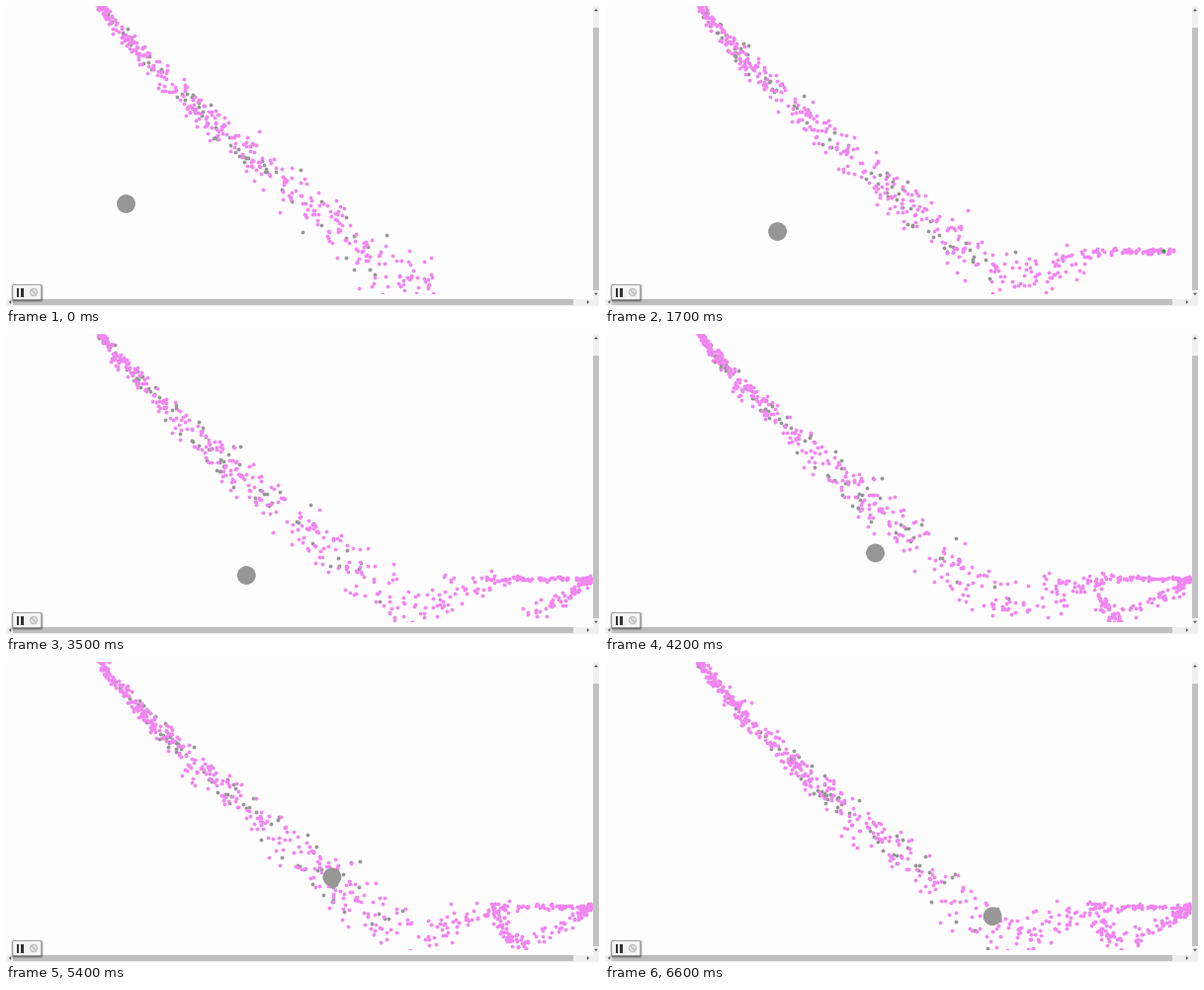
Animation, 600 px wide and 304 px high, one loop 6700 ms. Source, as a matplotlib script:

```python
import numpy as np
import matplotlib.pyplot as plt
from matplotlib.animation import FuncAnimation
from matplotlib.patches import Circle, FancyBboxPatch, Polygon, Rectangle

W, H, DPI = 600, 304, 100
FRAMES, STEP = 67, 100
LOOP = FRAMES * STEP / 1000
PINK, GREY, GREEN = "#f186f1", "#969696", "#1fa52d"

# Seconds spent in each leg of a particle's trip
FALL, HOP, WAIT, BACK, RISE = 6.3, 2.15, 0.25, 1.45, 1.05
HEAD_AGE = FALL + 0.3   # age of the leading particle when the loop starts


def leg(age, start, length):
    return np.clip((age - start) / length, 0, 1)


def stream(age):
    """Centre line (n, 2) and spread (n,): each leg adds its own displacement."""
    fall = leg(age, 0, FALL)
    hop = leg(age, FALL, HOP)
    climb = np.minimum(hop / 0.63, 1)
    back = leg(age, FALL + HOP + WAIT, BACK)
    rise = leg(age, FALL + HOP + WAIT + BACK, RISE)
    x = (94 + 318 * fall ** 1.4 + 179 * hop
         - 73 * back ** 2.8 - 22 * np.sin(rise * np.pi / 2))
    y = (-4 + 290 * fall ** 1.18 - 38 * (1 - (1 - climb) ** 2)
         + 40 * back ** 2.3 - 40 * rise)
    spread = 1.5 + 12 * fall - 12.3 * climb + 3.5 * back
    return np.column_stack([x, y]), spread


class Spray:
    def __init__(self, rng, rate, life):
        n = int(rate * (HEAD_AGE + LOOP))
        self.born = rng.uniform(-HEAD_AGE, LOOP, n)
        self.drift = np.clip(rng.normal(0, 1, (n, 2)), -2.4, 2.4)
        self.life = rng.uniform(*life, n)

    def at(self, t):
        age = t - self.born
        live = (age >= 0) & (age < self.life)
        mid, spread = stream(age[live])
        xy = mid + self.drift[live] * spread[:, None]
        xy[:, 0] = np.minimum(xy[:, 0], 591)
        landed = age[live] > FALL + 0.6 * HOP
        xy[landed, 1] = np.maximum(xy[landed, 1], 245)
        return xy


rng = np.random.default_rng(12)
pink = Spray(rng, 56, (FALL + 4.2, FALL + 5.4))
grey = Spray(rng, 13, (FALL - 0.7, FALL))


def ball_at(t):
    """Sideways push with one bounce on the floor."""
    fall = 200.5 - 12.7 * t + 17.17 * t * t
    rise = 214.3 + 15.2 * (t - 4.91) ** 2
    return 121.5 + 27.8 * t + 2 * t * t, min(fall, rise)


fig = plt.figure(figsize=(W / DPI, H / DPI), dpi=DPI, facecolor="#fefdfe")
ax = fig.add_axes([0, 0, 1, 1])
ax.set(xlim=(0, W), ylim=(H, 0))
ax.axis("off")


def box(x, y, w, h, color, z=5):
    ax.add_patch(Rectangle((x, y), w, h, fc=color, ec="none", zorder=z))


def rounded(x, y, w, h, r, **style):
    ax.add_patch(FancyBboxPatch(
        (x, y), w, h, boxstyle=f"round,pad=0,rounding_size={r}", **style))


def arrow(x, y, dx, dy):
    """Small triangle at (x, y) pointing along (dx, dy)."""
    tip = (x + 1.2 * dx, y + 1.2 * dy)
    base = [(x - 1.2 * dx + 2 * s * dy, y - 1.2 * dy + 2 * s * dx)
            for s in (-1, 1)]
    ax.add_patch(Polygon([tip, *base], fc="#555555", ec="none", zorder=6))


view = Rectangle((0, 0), 593, 291, fc="none", ec="none")
ax.add_patch(view)


def dots(color, z):
    s = ax.scatter([], [], s=7.6, c=color, linewidths=0, zorder=z)
    s.set_clip_path(view)
    return s


grey_dots, pink_dots, green_dot = dots(GREY, 2), dots(PINK, 2.1), dots(GREEN, 3)
ball = ax.add_patch(Circle((0, 0), 9.4, fc=GREY, ec="none", zorder=4))
ball.set_clip_path(view)

# Scroll bars
box(593.5, 0, 6.5, 297, "#f0f0f0")
box(594, 22, 6, 266, "#c1c1c1")
box(0, 297, W, 7, "#f0f0f0")
box(7, 297, 567, 6, "#bfbfbf")
arrow(597, 4, 0, -1)
arrow(597, 292, 0, 1)
arrow(4, 300, -1, 0)
arrow(589, 300, 1, 0)

# Control panel with a soft shadow
for grow in (2, 1.2, 0.5):
    rounded(7 - grow, 283.5 - grow, 29 + 2 * grow, 15 + 2 * grow, 2,
            fc="#222222", ec="none", alpha=0.25 / (grow + 0.3), zorder=7)
rounded(6.8, 282.5, 29, 15, 1.5, fc="#f4f4f4", ec="#8a8a8a", lw=0.5, zorder=8)
for x in (10.5, 15):
    box(x, 285.5, 2.6, 9, "#333333", 9)
ax.add_patch(Circle((28, 290), 3.6, fc="#e2e2e2", ec="#bcbcbc", lw=0.8, zorder=9))
ax.plot([25.6, 30.4], [287.6, 292.4], color="#bcbcbc", lw=0.8, zorder=9)


def draw(i):
    t = i * STEP / 1000
    pink_dots.set_offsets(pink.at(t))
    grey_dots.set_offsets(grey.at(t))
    spark, _ = stream(np.array([t + FALL + 0.14]))
    green_dot.set_offsets(spark)
    green_dot.set_visible(1.5 <= t <= 1.9)
    ball.center = ball_at(t)
    return pink_dots, grey_dots, green_dot, ball


anim = FuncAnimation(fig, draw, frames=FRAMES, interval=STEP,
                     repeat=True, repeat_delay=0, blit=False)
plt.show()
```
